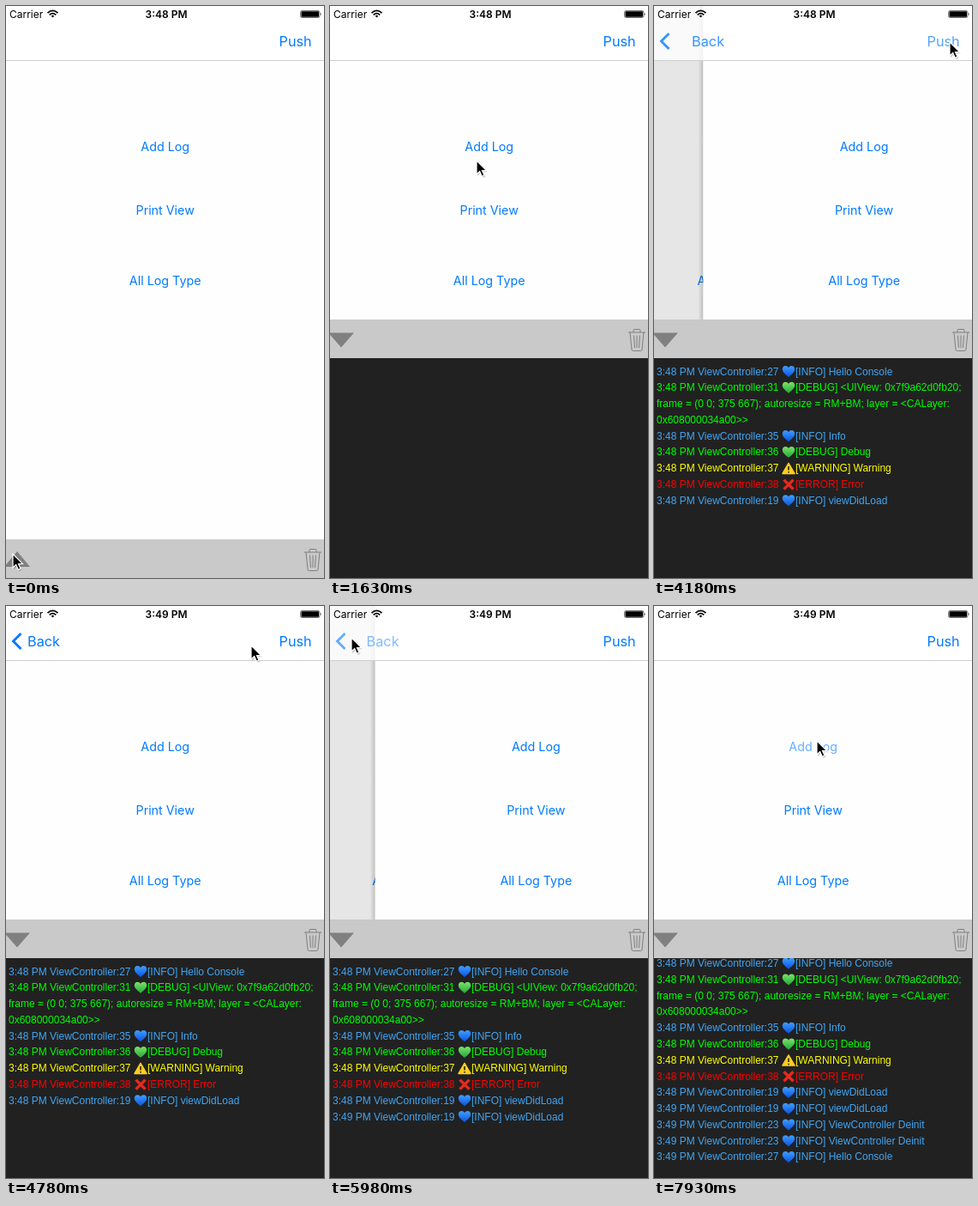
An HTML page for the animation above (8 s loop, 371 px wide and 666 px high).

```html
<!DOCTYPE html>
<html lang="en">
<head>
<meta charset="utf-8">
<title>In-app log console</title>
<style>
  html, body { margin: 0; width: 100%; height: 100%; overflow: hidden; background: #fefefe; }
  #stage { display: block; width: 371px; height: 666px; }
  text { font-family: Inter, Roboto, sans-serif; white-space: pre; }
  .link { fill: #007aff; font-size: 14.3px; text-anchor: middle; }
  .nav { fill: #007aff; font-size: 16.3px; }
  .log { font: 12px "Liberation Sans", Arial, sans-serif; }
</style>
</head>
<body>
<svg id="stage" viewBox="0 0 371 666" xmlns="http://www.w3.org/2000/svg">
  <defs>
    <linearGradient id="edge">
      <stop offset="0" stop-opacity="0"/>
      <stop offset="1" stop-opacity=".2"/>
    </linearGradient>
    <linearGradient id="blue" x2="0" y2="1">
      <stop offset="0" stop-color="#3f9fff"/><stop offset="1" stop-color="#0b50e0"/>
    </linearGradient>
    <linearGradient id="green" x2="0" y2="1">
      <stop offset="0" stop-color="#7be36a"/><stop offset="1" stop-color="#22a838"/>
    </linearGradient>
    <path id="heart" d="M8 14C5 11 .8 8.500 .8 4.600C.8 2.200 2.500 .8 4.400 .8C6 .8 7.300 1.700 8 3C8.700 1.700 10 .8 11.600 .8C13.500 .8 15.200 2.200 15.200 4.600C15.200 8.500 11 11 8 14Z"/>
    <g id="info"><use href="#heart" fill="url(#blue)"/></g>
    <g id="debug"><use href="#heart" fill="url(#green)"/></g>
    <g id="warning">
      <path d="M8 1.500L15 13.500H1Z" fill="#ffcc22" stroke="#ffcc22" stroke-width="1.500" stroke-linejoin="round"/>
      <path d="M8 5V9.500M8 11.200V12.700" stroke="#222" stroke-width="1.600"/>
    </g>
    <g id="error"><path d="M2.500 2L13.500 13M13.500 2L2.500 13" stroke="#e8291c" stroke-width="3.400"/></g>
  </defs>

  <g id="under"></g>
  <rect id="dim" width="371" height="666"/>
  <g id="top"></g>

  <rect width="371" height="64" fill="#fff" fill-opacity=".8"/>
  <path d="M0 63.500H371" stroke="#cfcfcf"/>
  <text x="4" y="13.600" font-size="12">Carrier</text>
  <g fill="none" stroke="#000" stroke-width="1.700">
    <path d="M48.500 8.100Q54.500 2.700 60.500 8.100M50.700 10.400Q54.500 7 58.300 10.400"/>
    <path d="M52.700 11.400Q54.500 10 56.300 11.400L54.500 13.400Z" fill="#000" stroke="none"/>
  </g>
  <text id="clock" x="187" y="13.600" font-size="12" font-weight="600" text-anchor="middle"></text>
  <rect x="343.500" y="5.500" width="22.500" height="8" rx="2" fill="none" stroke="#000" stroke-opacity=".55"/>
  <rect x="344.500" y="6.300" width="20.500" height="6.400" rx=".8"/>
  <path d="M366.800 7.700Q368.500 9.500 366.800 11.300Z"/>
  <path id="arrow" d="M17.500 32L8.500 41L17.500 50" fill="none" stroke="#007aff" stroke-width="2.900"/>
  <text id="backOld" class="nav" y="47">Back</text>
  <text id="backNew" class="nav" y="47">Back</text>
  <text class="nav push" x="318.500" y="47">Push</text>

  <g id="panel">
    <rect width="371" height="46" fill="#c9c9c9"/>
    <rect y="45" width="371" height="256" fill="#212121"/>
    <path id="toggle" fill="#808080"/>
    <path d="M348 15H368M354 15V12.500Q354 11.500 355 11.500H361Q362 11.500 362 12.500V15M350 15L352 35Q352.200 36.500 353.500 36.500H362.500Q363.800 36.500 364 35L366 15M354.500 18.500L355.500 33M358 18.500V33M361.500 18.500L360.500 33" fill="none" stroke="#808080"/>
    <svg y="45" width="371" height="256"><g id="rows"></g></svg>
  </g>

  <g id="cursor">
    <path d="M1 2V18L5 14.500L7.500 20L10.500 18.700L8 13.300H13Z" opacity=".2"/>
    <path d="M0 0V16L3.700 12.600L6.200 18.300L9 17L6.500 11.600H11.600Z" stroke="#fff" stroke-width="1.200"/>
  </g>
</svg>
<script>
const LOOP = 8000, STEP = 150, OPEN = 600, W = 371, PITCH = 18.78;
const PUSH = [4000, 5200], POP = [5943, 6856];
const $ = id => document.getElementById(id);

// moments each control is let go
const taps = {
  add: [1930, 7780], print: [2530], all: [3130], push: PUSH, back: [5830, 6880]
};
const [firstAdd, secondAdd] = taps.add;

const colors = { info: '#40a6f4', debug: '#00ff00', warning: '#ffff00', error: '#ff0000' };
// time shown, source line, kind, message lines
const logs = [
  [firstAdd, 27, 'info', 'Hello Console'],
  [taps.print[0], 31, 'debug', '<UIView: 0x7f9a62d0fb20;',
    'frame = (0 0; 375 667); autoresize = RM+BM; layer = <CALayer:', '0x608000034a00>>'],
  ...['Info', 'Debug', 'Warning', 'Error'].map((s, i) => [taps.all[0], 35 + i, s.toLowerCase(), s]),
  ...PUSH.map(at => [at, 19, 'info', 'viewDidLoad']),
  ...POP.map(at => [at + 450, 23, 'info', 'ViewController Deinit']),
  [secondAdd, 27, 'info', 'Hello Console']
];

// pointer moves: start, end, x, y
const moves = [
  [0, 0, 8, 638], [880, 1630, 171, 180], [1630, 1780, 187, 160],
  [2080, 2380, 186, 234], [2680, 2980, 187, 311], [3280, 3730, 345, 42],
  [4180, 4780, 286, 46], [4780, 5080, 338, 40], [5230, 5830, 25, 37],
  [6730, 7030, 159, 103], [7030, 7330, 190, 157]
];

const clamp = u => Math.min(1, Math.max(0, u));
const smooth = u => u * u * (3 - 2 * u);

// critically damped spring, from 0 to 1
function spring(ms) {
  const x = Math.max(0, ms) * .01826;
  const v = 1 - (1 + x) * Math.exp(-x);
  return v > .995 ? 1 : v;
}

function pointer(t) {
  let x = 0, y = 0;
  for (const [from, to, tx, ty] of moves) {
    if (t < from) break;
    const u = smooth(clamp((t - from) / (to - from || 1) + (to === from)));
    x += (tx - x) * u;
    y += (ty - y) * u;
  }
  return [x, y];
}

// a held control is faint and recovers after release
function glow(key, t) {
  const up = taps[key].filter(at => t >= at - STEP).pop();
  return up === undefined ? 1 : .2 + .8 * clamp((t - up) / 300);
}

// upper page offset (share of the width) and depth of the page below it
function pages(t) {
  const pushed = PUSH.filter(at => at <= t), popped = POP.filter(at => at <= t);
  const depth = pushed.length - popped.length;
  if (popped.length) return [spring(t - popped.pop()), depth];
  if (pushed.length) return [1 - spring(t - pushed.pop()), depth - 1];
  return [1, 0];
}

// the picture is refreshed in even steps after the opening hold
function tick(t) {
  if (t < OPEN) return 0;
  return Math.max(OPEN, 730 + STEP * Math.floor((t - 730) / STEP));
}

const place = (id, x, y) => $(id).setAttribute('transform', `translate(${x} ${y})`);
const fade = (id, v) => { $(id).style.opacity = v; };

const buttons = [['add', 'Add Log', 169.3], ['print', 'Print View', 243.3], ['all', 'All Log Type', 324.5]];
const page = '<rect x="-2" width="373" height="666" fill="#fefefe"/>' + buttons.map(([key, label, y]) =>
  `<text class="link ${key}" x="185.7" y="${y}">${label}</text>`).join('');
$('under').innerHTML = page;
$('top').innerHTML = '<rect id="shadow" x="-8" width="6" height="666" fill="url(#edge)"/>' + page;

const text = (x, y, s) => `<text class="log" x="${x}" y="${y}">${s.replace(/</g, '&lt;')}</text>`;
let line = 0;
const nextY = () => 19.5 + PITCH * line++;
$('rows').innerHTML = logs.map(([at, src, kind, msg, ...rest]) => {
  const y = nextY(), minute = at < PUSH[1] ? 48 : 49;
  return `<g fill="${colors[kind]}">` + text(3, y, `3:${minute} PM ViewController:${src}`) +
    `<use href="#${kind}" x="149" y="${y - 11.3}"/>` +
    text(165, y, `[${kind.toUpperCase()}] ${msg}`) +
    rest.map(s => text(3, nextY(), s)).join('') + '</g>';
}).join('');
const rows = [...$('rows').children];

function draw(now) {
  const t = tick(now % LOOP);
  const [p, lower] = pages(t);

  place('under', -111 * (1 - p), 0);
  place('top', W * p, 0);
  fade('dim', .11 * (1 - p));
  fade('shadow', 1 - p);

  for (const key of ['add', 'print', 'all', 'push'])
    for (const el of document.getElementsByClassName(key)) el.style.opacity = glow(key, t);

  const held = glow('back', t), leaving = held * (1 - p) ** 1.3;
  $('backOld').setAttribute('x', 25 + 119 * p);
  $('backNew').setAttribute('x', 25 - 60 * (1 - p));
  fade('backOld', leaving);
  fade('backNew', lower * p ** 2);
  fade('arrow', lower ? held : leaving);

  $('clock').textContent = t < 4330 ? '3:48 PM' : '3:49 PM';
  place('panel', 0, 621 - 256 * spring(t - OPEN));
  $('toggle').setAttribute('d', t < OPEN ? 'M-2 32H28L13 14Z' : 'M-2 15.500H28L13 32.500Z');
  rows.forEach((row, i) => { row.style.display = t >= logs[i][0] ? '' : 'none'; });
  place('rows', 0, t > secondAdd ? -PITCH / 2 : 0);
  place('cursor', ...pointer(t));
}

const start = performance.now();
function loop() {
  draw(performance.now() - start);
  requestAnimationFrame(loop);
}
loop();
</script>
</body>
</html>
```
